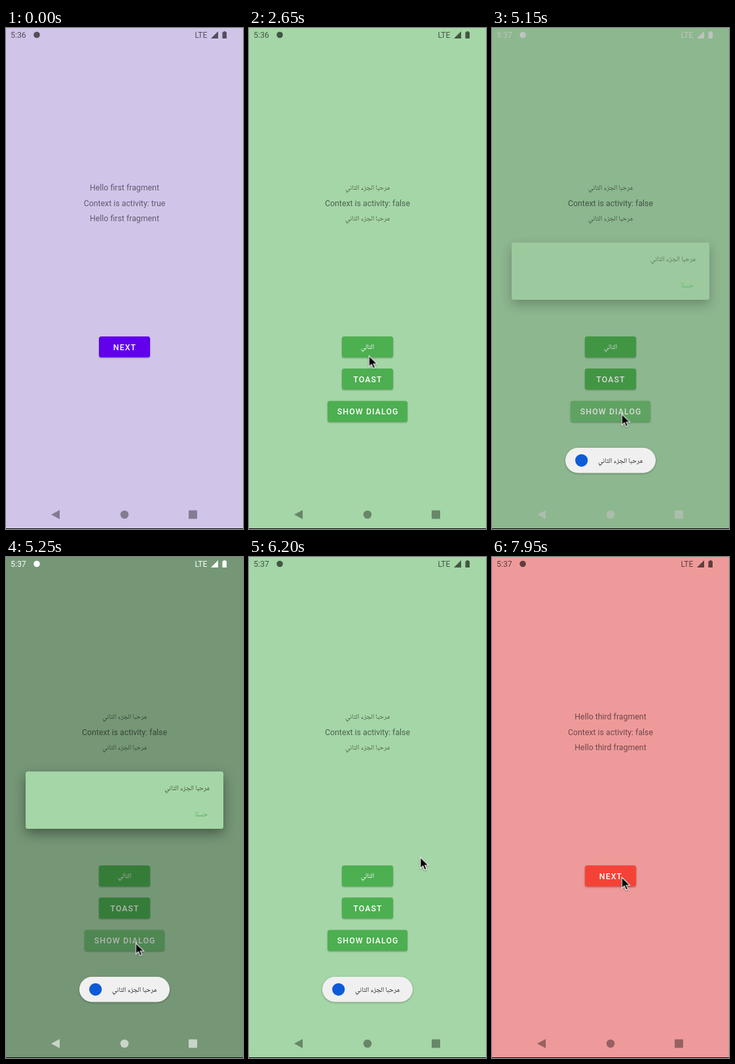
An HTML page that plays this animation: 362 px wide and 765 px high, repeating every 8000 ms.

```html
<!DOCTYPE html>
<html lang="en">
<head>
<meta charset="utf-8">
<title>Fragments demo</title>
<style>
html, body { margin: 0; width: 100%; height: 100%; overflow: hidden; background: #d1c4e9; }
svg { display: block; width: 362px; height: 765px; font: 12.33px Roboto, "Noto Sans", sans-serif; }
svg * { animation-duration: 8s; animation-timing-function: linear; animation-iteration-count: infinite; }
.c { text-anchor: middle; }
.ar { font: 10.5px "Noto Naskh Arabic", "DejaVu Sans", sans-serif; }
.body { fill: rgba(0, 0, 0, .54); }
.label { fill: #fff; font-weight: 500; letter-spacing: 1.1px; }
.label.ar { font-weight: 400; letter-spacing: 0; }
.raise { filter: drop-shadow(0 1.2px 1.2px rgba(0, 0, 0, .3)); }

/* pages */
#one, #two, #three, .early, .late, #cursor { animation-timing-function: step-end; }
#one { animation-name: one; }
#two { animation-name: two; }
#three { animation-name: three; }
@keyframes one { 0% { visibility: visible } 21.875%, 100% { visibility: hidden } }
@keyframes two { 0% { visibility: hidden } 21.875% { visibility: visible } 83.125%, 100% { visibility: hidden } }
@keyframes three { 0% { visibility: hidden } 83.125%, 100% { visibility: visible } }
.press { animation-name: press; animation-timing-function: step-end; }
@keyframes press {
  0% { filter: drop-shadow(0 1.2px 1.2px rgba(0, 0, 0, .3)) }
  99.375%, 100% { filter: drop-shadow(0 1.8px 1.8px rgba(0, 0, 0, .38)) }
}

/* button ripples */
.ripple { fill: #fff; transform-box: fill-box; transform-origin: center; }
#r1 { animation-name: rippleA; }
#r2 { animation-name: rippleB; }
@keyframes rippleA {
  0%, 47.5% { transform: scale(0); opacity: .2 }
  51.25%, 54.375% { transform: scale(1); opacity: .2 }
  58.125%, 100% { transform: scale(1); opacity: 0 }
}
@keyframes rippleB {
  0%, 60.625% { transform: scale(0); opacity: .2 }
  63.75%, 66.875% { transform: scale(1); opacity: .2 }
  70%, 100% { transform: scale(1); opacity: 0 }
}

/* system bars */
.early { animation-name: early; }
.late { animation-name: late; }
@keyframes early { 0% { opacity: 1 } 61.25%, 100% { opacity: 0 } }
@keyframes late { 0% { opacity: 0 } 61.25%, 100% { opacity: 1 } }
#status { animation-name: status; }
#nav { animation-name: nav; }
@keyframes status {
  0%, 63.125%, 77.5%, 100% { fill: rgba(0, 0, 0, .6) }
  65%, 76.25% { fill: #fff }
}
@keyframes nav {
  0%, 63.125%, 77.5%, 100% { fill: rgba(0, 0, 0, .37) }
  65%, 76.25% { fill: rgba(255, 255, 255, .6) }
}

/* dialog and toast */
#dim { animation-name: dim; }
#dialog { animation-name: dialog; transform-box: fill-box; transform-origin: center; }
#dialog rect { filter: drop-shadow(0 7px 9px rgba(0, 0, 0, .4)); }
@keyframes dim {
  0%, 63.125%, 77.5%, 100% { opacity: 0 }
  65.875%, 76.25% { opacity: .32 }
}
@keyframes dialog {
  0%, 63.125% { opacity: 0; transform: scale(.95) }
  64.375% { opacity: .62; transform: none }
  65.125%, 76.25% { opacity: 1; transform: none }
  77.25%, 100% { opacity: 0; transform: none }
}
#toast { animation-name: toast; }
#toast g { animation-name: content; }
#toast rect { filter: drop-shadow(0 1.5px 1.5px rgba(0, 0, 0, .3)); }
@keyframes toast {
  0%, 50% { opacity: 0 }
  52%, 78.125% { opacity: 1 }
  81.25%, 100% { opacity: 0 }
}
@keyframes content { 0%, 50.625% { opacity: 0 } 53.75%, 100% { opacity: 1 } }

/* pointer: moves in 50 ms ticks, holds in between */
#cursor { animation-name: move; filter: drop-shadow(0 1px .8px rgba(0, 0, 0, .35)); }
@keyframes move {
  0% { transform: translate(125px, 522px); opacity: 0 }
  15% { transform: translate(125px, 522px); opacity: 1 }
  15.625% { transform: translate(168px, 503px) }
  16.25% { transform: translate(209px, 488px) }
  16.875% { transform: translate(190px, 492px) }
  17.5% { transform: translate(177px, 496px) }
  19.375% { transform: translate(178px, 494px) }
  20% { transform: translate(180px, 490px) }
  26.25% { transform: translate(180px, 490px); animation-timing-function: steps(5) }
  29.375% { transform: translate(181px, 507px) }
  31.25% { transform: translate(181px, 507px); animation-timing-function: steps(3) }
  33.125% { transform: translate(182.5px, 499.5px) }
  35.625% { transform: translate(182.5px, 499.5px); animation-timing-function: steps(4) }
  38.125% { transform: translate(181px, 493px); animation-timing-function: steps(7) }
  42.5% { transform: translate(194px, 520px); animation-timing-function: steps(5) }
  45.625% { transform: translate(189px, 533px) }
  47.5% { transform: translate(189px, 533px); animation-timing-function: steps(2) }
  48.75% { transform: translate(187px, 541px) }
  55.625% { transform: translate(187px, 541px); animation-timing-function: steps(4) }
  58.125% { transform: translate(197px, 592px) }
  58.75% { transform: translate(197.5px, 588.5px) }
  68.75% { transform: translate(197.5px, 588.5px); animation-timing-function: steps(4) }
  71.25% { transform: translate(137px, 567px) }
  71.875% { transform: translate(185px, 520px) }
  72.5% { transform: translate(250px, 445px) }
  73.125% { transform: translate(303px, 395px) }
  73.75% { transform: translate(295.5px, 401px) }
  76.875% { transform: translate(284px, 428px) }
  77.5% { transform: translate(261px, 457.5px) }
  78.125% { transform: translate(215px, 478px) }
  78.75% { transform: translate(186px, 485px) }
  79.375% { transform: translate(179px, 484px) }
  85% { transform: translate(179px, 484px); animation-timing-function: steps(4) }
  87.5%, 100% { transform: translate(197.5px, 488px); opacity: 1 }
}
</style>
</head>
<body>
<svg viewBox="0 0 362 765">
  <defs>
    <clipPath id="k1"><rect x="142" y="520" width="78" height="32" rx="3.5"/></clipPath>
    <clipPath id="k2"><rect x="120" y="569.5" width="122" height="32" rx="3.5"/></clipPath>
  </defs>

  <g id="one">
    <rect width="362" height="765" fill="#d1c4e9"/>
    <g class="body c">
      <text x="181" y="248">Hello first fragment</text>
      <text x="181" y="271.7">Context is activity: true</text>
      <text x="181" y="295.3">Hello first fragment</text>
    </g>
    <rect class="raise" x="142" y="471" width="78" height="32" rx="3.5" fill="#6200ee"/>
    <text class="label c" x="181.5" y="492">NEXT</text>
  </g>

  <g id="two">
    <rect width="362" height="765" fill="#a5d6a7"/>
    <g class="body c">
      <text class="ar" x="181" y="247">مرحبا الجزء الثاني</text>
      <text x="181" y="271.7">Context is activity: false</text>
      <text class="ar" x="181" y="294.3">مرحبا الجزء الثاني</text>
    </g>
    <g class="raise" fill="#4caf50">
      <rect x="142" y="471" width="78" height="32" rx="3.5"/>
      <rect x="142" y="520" width="78" height="32" rx="3.5"/>
      <rect x="120" y="569.5" width="122" height="32" rx="3.5"/>
    </g>
    <g clip-path="url(#k1)"><circle id="r1" class="ripple" cx="188" cy="542" r="60"/></g>
    <g clip-path="url(#k2)"><circle id="r2" class="ripple" cx="198" cy="590" r="90"/></g>
    <text class="label ar c" x="181" y="490">التالي</text>
    <text class="label c" x="181.5" y="541">TOAST</text>
    <text class="label c" x="181.7" y="590.3">SHOW DIALOG</text>
  </g>

  <g id="three">
    <rect width="362" height="765" fill="#ef9a9a"/>
    <g class="body c">
      <text x="181" y="248">Hello third fragment</text>
      <text x="181" y="271.7">Context is activity: false</text>
      <text x="181" y="295.3">Hello third fragment</text>
    </g>
    <rect class="press" x="142" y="471" width="78" height="32" rx="3.5" fill="#f44336"/>
    <text class="label c" x="181.5" y="492">NEXT</text>
  </g>

  <rect id="dim" width="362" height="765" opacity="0"/>

  <g id="dialog">
    <rect x="30" y="327.5" width="302" height="87.5" rx="3.5" fill="#a5d6a7"/>
    <text class="ar" x="311" y="355.5" text-anchor="end" fill="rgba(0,0,0,.6)" style="font-size:10.7px">مرحبا الجزء الثاني</text>
    <text class="ar" x="308" y="396" text-anchor="end" fill="#4caf50">حسنًا</text>
  </g>

  <g id="status">
    <text class="early" x="7" y="15.2">5:36</text>
    <text class="late" x="7" y="15.2">5:37</text>
    <circle cx="47" cy="10.5" r="4.8"/>
    <text x="288.5" y="15" font-size="12">LTE</text>
    <path d="M324 5V16H313Z"/>
    <path d="M332.3 5h3v1.2h1.7V16h-6.500V6.200h1.800Z"/>
  </g>

  <g id="nav">
    <path d="M69 743L82 736V750Z"/>
    <circle cx="181" cy="743" r="6.3"/>
    <rect x="279" y="736.500" width="13" height="13" rx="1"/>
  </g>

  <g id="toast">
    <rect x="112" y="641" width="138" height="38.500" rx="19.250" fill="#f0f0f0"/>
    <g>
      <circle cx="136.700" cy="660.300" r="9.600" fill="#0f5bd7"/>
      <text class="ar c" x="196" y="664" fill="#222">مرحبا الجزء الثاني</text>
    </g>
  </g>

  <g id="cursor">
    <path d="M.8 1V18L4.700 14.300L7.300 20.300L10.300 19L7.700 13.200H13Z" fill="#000" stroke="#fff" stroke-width="1.100"/>
  </g>

  <rect y="764" width="362" height="1"/>
</svg>
</body>
</html>
```
